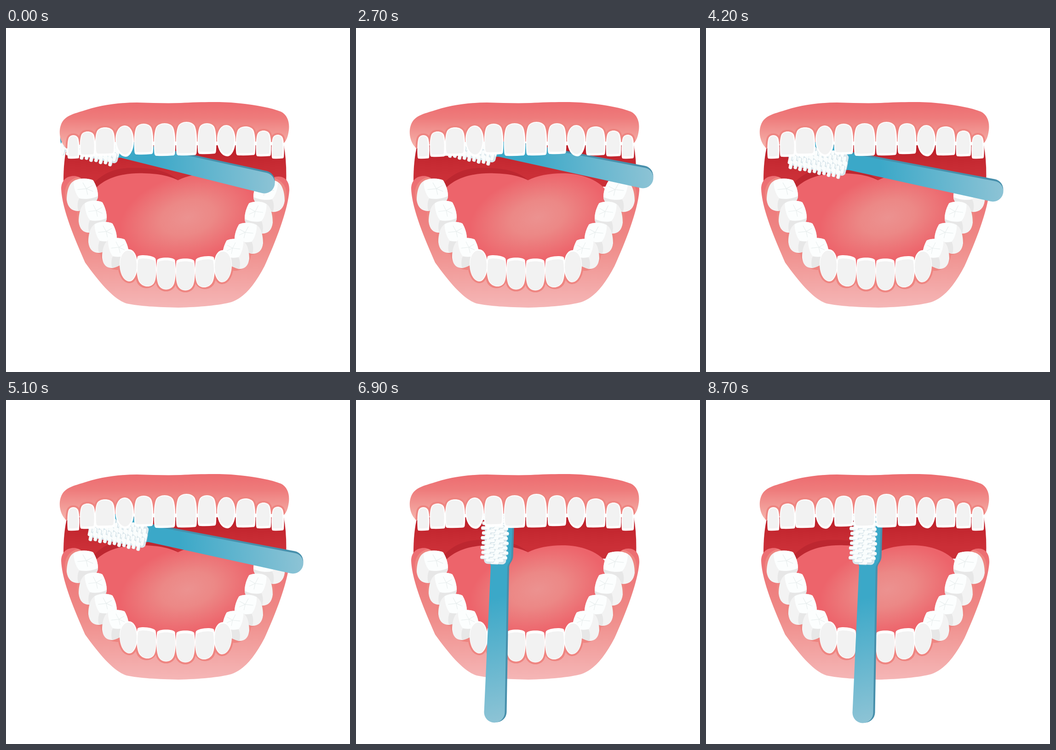
An HTML page that plays this animation: 748 px wide and 748 px high, repeating every 9 s.

```html
<!DOCTYPE html>
<html lang="en">
<head>
<meta charset="utf-8">
<title>Brushing teeth</title>
<style>
html, body { margin: 0; width: 100%; height: 100%; overflow: hidden; background: #fff; }
svg { display: block; width: 100vw; height: 100vh; }
.halo { fill: #ee8581; stroke: #ee8581; stroke-width: 8; vector-effect: non-scaling-stroke; }
</style>
</head>
<body>
<svg viewBox="0 0 748 748">
  <defs>
    <linearGradient id="upperPink" gradientUnits="userSpaceOnUse" x1="0" y1="162" x2="0" y2="256">
      <stop stop-color="#ed6c70"/><stop offset=".35" stop-color="#ee7b7b"/><stop offset="1" stop-color="#f5b0a9"/>
    </linearGradient>
    <linearGradient id="lowerPink" gradientUnits="userSpaceOnUse" x1="0" y1="322" x2="0" y2="607">
      <stop stop-color="#ec6c71"/><stop offset=".5" stop-color="#ef8a87"/><stop offset="1" stop-color="#f5b6b6"/>
    </linearGradient>
    <linearGradient id="throat" gradientUnits="userSpaceOnUse" x1="0" y1="255" x2="0" y2="320">
      <stop stop-color="#bb1e28"/><stop offset=".6" stop-color="#c62a32"/><stop offset="1" stop-color="#cb2f37"/>
    </linearGradient>
    <radialGradient id="tonguePink" gradientUnits="userSpaceOnUse" cx="0" cy="0" r="1"
      gradientTransform="translate(395 412) rotate(-14) scale(150 92)">
      <stop stop-color="#ec9290"/><stop offset=".4" stop-color="#ec8886"/><stop offset="1" stop-color="#ed646b"/>
    </radialGradient>
    <linearGradient id="handleBlue" gradientUnits="userSpaceOnUse" x1="-40" y1="-240" x2="30" y2="12">
      <stop stop-color="#3ba8c8"/><stop offset="1" stop-color="#8cc3d5"/>
    </linearGradient>
    <path id="upperShape" d="M132 262C117 250 114 226 119 212C125 192 145 187 165 181C200 169 240 162 285 162
      C320 163 350 164 380 163C420 161 470 160 500 163C540 167 575 173 598 182C612 189 617 205 615 222
      C613 237 610 244 604 250C580 246 500 247 369 247C240 247 165 245 132 262Z"/>
    <path id="lowerShape" d="M120 350C120 328 136 320 152 322Q162 324 168 332L178 400L208 450L245 492L300 520H438
      L493 492L530 450L560 400L572 332Q580 323 592 323C608 323 617 335 616 354C613 392 592 452 562 518
      C540 560 517 587 490 596C465 603 420 607 375 608C330 607 290 605 262 599C235 590 205 556 172 510
      C150 460 122 395 120 350Z"/>
    <clipPath id="upperClip"><use href="#upperShape"/></clipPath>
    <clipPath id="lowerClip"><use href="#lowerShape"/></clipPath>
    <path id="handle" d="M18 -316C19 -326 26 -328 26 -340V-430Q26 -455 0 -455T-26 -430V-335
      C-26 -325 -18 -326 -18 -316L-22.5 0A22.5 22.5 0 0 0 22.5 0Z"/>
    <g id="molar">
      <path fill="#f3f3f3" d="M14 6C24 -1 44 -1 54 4C60 14 64 26 64 38C64 52 44 66 24 70C10 70 2 62 0 46C0 30 4 12 14 6Z"/>
      <path fill="#e7e7e7" d="M26 42C40 45 54 42 64 38C64 52 44 66 24 70C21 60 22 50 26 42Z"/>
      <path fill="#fcfefe" d="M14 6C24 -1 44 -1 54 4C60 14 64 26 64 38C54 43 40 46 26 43C18 35 14 18 14 6Z"/>
      <path fill="none" stroke="#e8eeee" stroke-width="1.2" d="M33 9L40 22L53 15M40 22L54 28M40 22L43 35M40 22L22 24"/>
    </g>
  </defs>

  <path fill="url(#throat)" d="M133 255H604Q611 290 609 345H125Q124 290 133 255Z"/>
  <path fill="#bd2730" d="M180 350C205 318 232 304 275 304Q345 303 374 331L300 360Z"/>
  <path fill="url(#tonguePink)" d="M185 360C215 318 270 315 300 316C335 317 355 322 374 331
    C395 320 425 315 455 316C500 318 535 335 548 360L560 440L480 535H260L180 440Z"/>
  <use href="#lowerShape" fill="url(#lowerPink)"/>
  <g id="lowerTeeth"></g>
  <g id="brush"></g>
  <use href="#upperShape" fill="url(#upperPink)"/>
  <g id="upperTeeth"></g>
</svg>
<script>
const byId = id => document.getElementById(id);

// Tooth outlines in a unit box.
const outlines = {
  upper: "M.03 .9C-.01 .6 .02 .25 .12 .12C.25 -.04 .75 -.04 .88 .12C.98 .25 1.01 .6 .97 .9C.96 .98 .92 .99 .85 .99Q.5 1.01 .15 1C.08 1 .04 .98 .03 .9Z",
  canine: "M.5 0C.82 0 1 .22 1 .5C1 .78 .78 1 .56 1C.25 1 0 .78 0 .45C0 .2 .2 0 .5 0Z",
  lower: "M.04 .08C.12 -.02 .88 -.02 .96 .08C1.02 .3 1.02 .66 .9 .84C.75 1.05 .25 1.05 .1 .84C-.02 .66 -.02 .3 .04 .08Z"
};

const shape = (kind, [x0, y0, x1, y1], attrs) =>
  `<path d="${outlines[kind]}" transform="translate(${x0} ${y0}) scale(${x1 - x0} ${y1 - y0})" ${attrs}/>`;

const halo = (kind, box) => shape(kind, box, 'class="halo"');

function tooth(kind, box, [left, top, right, bottom]) {
  const [x0, y0, x1, y1] = box;
  return shape(kind, box, 'fill="#fff"') +
    shape(kind, [x0 + left, y0 + top, x1 - right, y1 - bottom], 'fill="#f2f2f2"');
}

const upper = [
  [133, 233, 160, 284], [160, 225, 195, 280], [193, 216, 238, 278], [238, 212, 278, 280],
  [278, 208, 321, 275], [321, 207, 369, 278], [369, 204, 416, 277], [416, 207, 458, 274],
  [459, 211, 499, 279], [499, 214, 543, 277], [543, 223, 577, 279], [577, 232, 605, 284]
];
const upperKind = i => i === 3 || i === 8 ? "canine" : "upper";
byId("upperTeeth").innerHTML =
  `<g clip-path="url(#upperClip)">${upper.map((box, i) => halo(upperKind(i), box)).join("")}</g>` +
  upper.map((box, i) => tooth(upperKind(i), box, [2, 2, 3, 5])).join("");

// The lower row is built as a left half and mirrored.
const molars = [[132, 327, 200, 398], [158, 375, 219, 445], [179, 421, 241, 489], [209, 456, 267, 522]];
const canine = [247, 481, 286, 551];
const lateral = [284, 494, 327, 562];
const central = [327, 499, 369, 569];
const slanted = content => `<g transform="translate(0 -32) skewY(6)">${content}</g>`;
const halfHalos = molars.map(box => halo("canine", box)).join("") +
  halo("canine", canine) + halo("lower", lateral) + halo("lower", central);
const halfTeeth = molars.map(([x0, y0, x1, y1]) =>
    `<use href="#molar" transform="translate(${x0} ${y0}) scale(${(x1 - x0) / 64} ${(y1 - y0) / 70})"/>`).join("") +
  slanted(tooth("lower", lateral, [2, 7, 1.5, 1])) +
  tooth("canine", canine, [1, 3, 2, 1]) +
  tooth("lower", central, [1.5, 6, 1.5, 1]);
const mirrored = content => content + `<g transform="translate(738 2) scale(-1 1)">${content}</g>`;
byId("lowerTeeth").innerHTML =
  `<g clip-path="url(#lowerClip)">${mirrored(halfHalos)}</g>` + mirrored(halfTeeth);

function bristles() {
  let out = '<rect x="-33" y="-444" width="48" height="122" rx="8" fill="#dce8ed"/>';
  const stroke = (x, y, color, width) =>
    `<path d="M${x - 6} ${y}h12" stroke="${color}" stroke-width="${width}" stroke-linecap="round"/>`;
  for (let row = 11; row >= 0; row--) {
    for (let col = 0; col < 5; col++) {
      if (row === 0 && (col === 0 || col === 4)) continue;
      const x = 10 - col * 10 - (row % 2) * 2;
      const y = -326 - row * 10.6 - (col % 2) * 4;
      out += stroke(x, y + 1.2, "#cfdfe6", 7) + stroke(x, y, "#fafdfd", 6.5);
    }
  }
  return out;
}

byId("brush").innerHTML =
  '<use href="#handle" x="4" y="-1" fill="#478fab"/><use href="#handle" fill="url(#handleBlue)"/>' + bristles();

// Each stroke runs from a raised to a lowered pose [x, y, angle] in three steps.
const places = [
  { strokes: 3, from: [562, 337, -76.8], to: [574, 346, -79.2] },
  { strokes: 3, from: [624, 326, -78.4], to: [624, 355, -78.4] },
  { strokes: 2, from: [301, 649, 1.8], to: [301, 679, 1.8] },
  { strokes: 2, from: [341, 650, 1.8], to: [341, 680, 1.8] }
];
const sequence = places.flatMap(place => Array(place.strokes).fill(place));
const STEP = 300, LOOP = 9000;

function draw(now) {
  const step = Math.floor((now % LOOP) / STEP);
  const { from, to } = sequence[Math.floor(step / 3)];
  const [x, y, angle] = from.map((start, i) => start + (to[i] - start) * (step % 3) / 2);
  byId("brush").setAttribute("transform", `translate(${x} ${y}) rotate(${angle})`);
}

const begin = performance.now();
function tick() {
  draw(performance.now() - begin);
  requestAnimationFrame(tick);
}
tick();
</script>
</body>
</html>
```
